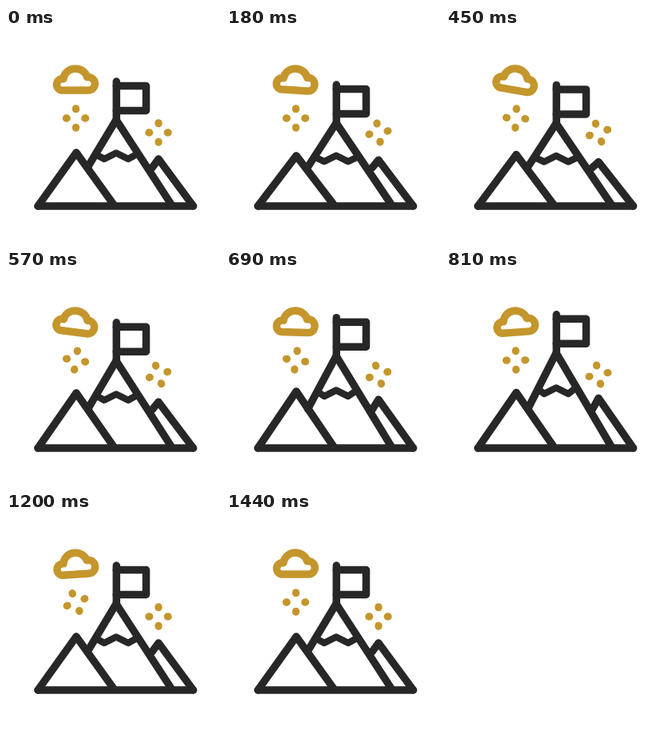
Recreate the animation shown at these times as an HTML page. Size 268x268 px, loop 1500 ms.

```html
<!DOCTYPE html>
<html lang="en">
<head>
<meta charset="utf-8">
<title>Mountain goal</title>
<style>
  html, body { margin: 0; width: 100%; height: 100%; overflow: hidden; background: #fff; }
  svg { display: block; width: 100%; height: 100%; }
  path { fill: none; stroke-width: 9.5; stroke-linecap: round; stroke-linejoin: round; }
  .ink { stroke: #272727; }
  .gold { stroke: #c4962c; }
</style>
</head>
<body>
<svg viewBox="0 0 268 268">
  <g class="ink">
    <path d="M40 223H234.5"/>
    <path id="left"/>
    <path id="right"/>
    <path id="peak"/>
    <path id="snow" style="stroke-width:8.5"/>
    <g id="flag">
      <path d="M138.3 67V114"/>
      <path d="M138.3 72.5H175.5V103.5H138.3"/>
    </g>
  </g>
  <g class="gold">
    <path id="cloud" d="M69.5 78H103A8.3 8.3 0 0 0 103 61.4H101.5A15 13.7 0 0 0 72 63.7A7.2 7.2 0 0 0 69.5 78Z"/>
    <path id="sparkA" style="stroke-width:9.3"/>
    <path id="sparkB" style="stroke-width:9.3"/>
  </g>
</svg>
<script>
const LOOP = 1500;
const el = id => document.getElementById(id);
const setPath = (id, d) => el(id).setAttribute('d', d);
const setTransform = (id, value) => el(id).setAttribute('transform', value);

// Each key is [time in ms, value]; the segments ease in and out.
const tracks = {
  peak: [[0, 0], [330, 7], [850, -11.5], [1040, 0]],
  left: [[0, 0], [300, 6], [680, -4], [1000, 0]],
  right: [[40, 0], [400, 4], [820, -3.5], [1150, 0]],
  cloud: [[0, 0], [450, 10], [950, -7.5], [1470, 0]],
  sparkA: [[340, 0], [620, 10], [1130, -25], [1440, 0]],
  sparkB: [[0, 0], [340, -18], [700, -17], [1000, 0]]
};

function valueAt(name, t) {
  const keys = tracks[name];
  if (t <= keys[0][0]) return keys[0][1];
  for (let i = 1; i < keys.length; i++) {
    const [t0, v0] = keys[i - 1], [t1, v1] = keys[i];
    if (t < t1) {
      const p = (t - t0) / (t1 - t0);
      return v0 + (v1 - v0) * p * p * (3 - 2 * p);
    }
  }
  return keys[keys.length - 1][1];
}

const sparkle = (x, y) =>
  `M${x} ${y - 11.3}v-.8M${x} ${y + 11.3}v.8M${x - 11.3} ${y}h-.8M${x + 11.3} ${y}h.8`;
setPath('sparkA', sparkle(87.5, 113));
setPath('sparkB', sparkle(191, 131));

function draw(now) {
  const t = now % LOOP;
  const at = name => valueAt(name, t);
  const lift = at('peak'), snow = lift * 0.8, reach = 26 + lift * 0.3;

  setPath('left', `M40 223L88 ${156 + at('left')}L134 220`);
  setPath('right', `M183 175L191 ${164 + at('right')}L234.5 223`);
  setPath('peak', `M102.5 174L138 ${115 + lift}L207 221`);
  setPath('snow', `M${138 - reach} ${158 + snow}L123 ${164 + snow}L138 ${156.5 + snow}L153 ${164 + snow}L${138 + reach} ${158 + snow}`);
  setTransform('flag', `translate(0 ${lift})`);
  setTransform('cloud', `rotate(${at('cloud')} 88 65)`);
  setTransform('sparkA', `rotate(${at('sparkA')} 87.5 113)`);
  setTransform('sparkB', `rotate(${at('sparkB')} 191 131)`);
}

const start = performance.now();
function tick() {
  draw(performance.now() - start);
  requestAnimationFrame(tick);
}
tick();
</script>
</body>
</html>
```
